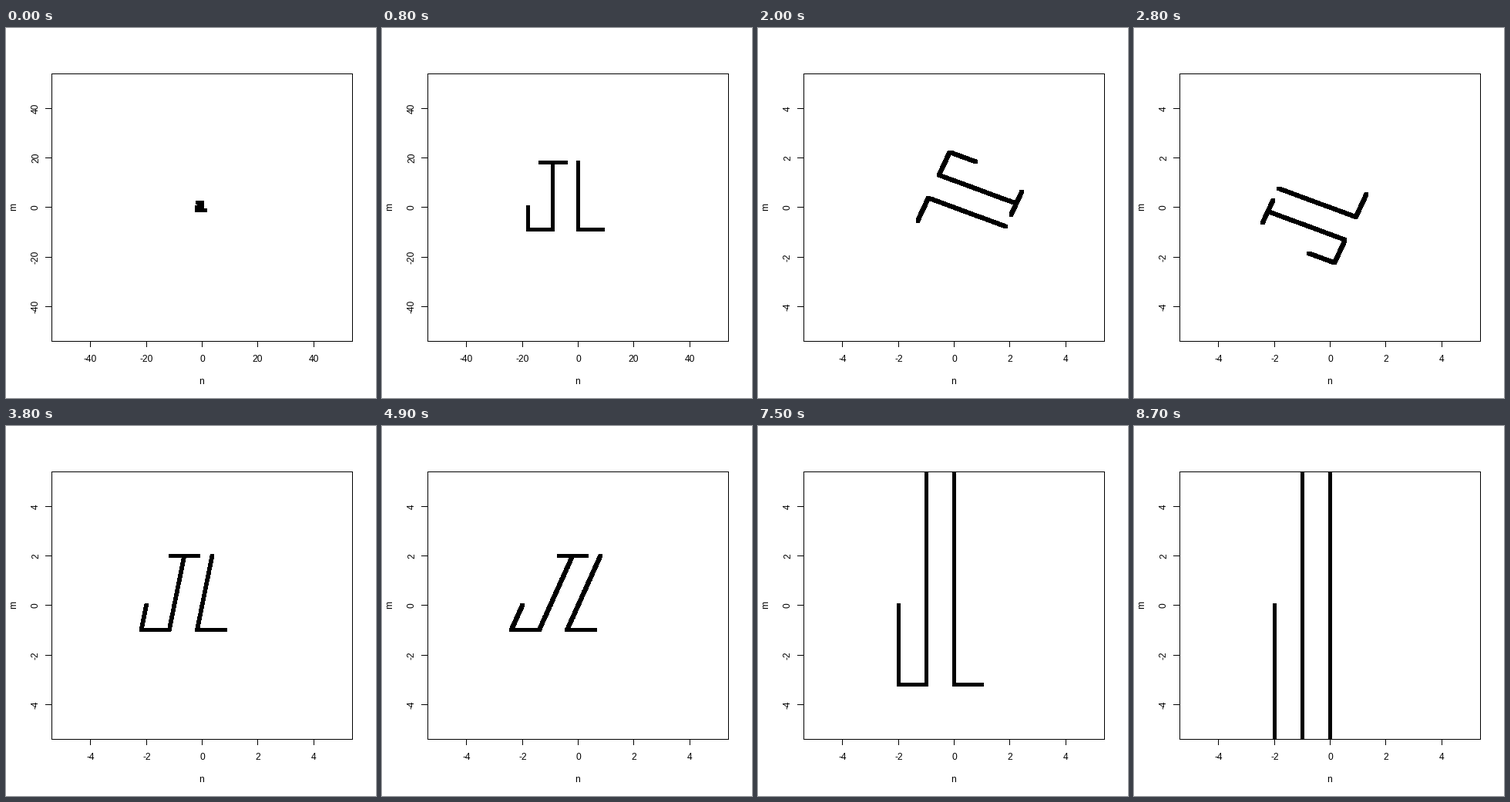
A matplotlib script that plays this animation: 480 px wide and 480 px high, repeating every 9 s.

```python
import numpy as np
import matplotlib.pyplot as plt
from matplotlib.animation import FuncAnimation
from matplotlib.patches import Rectangle

plt.rcParams["font.family"] = "Liberation Sans"
plt.rcParams["path.snap"] = False

SIZE, DPI = 480, 100
PX = 72 / DPI                               # points per pixel
LEFT, TOP, RIGHT, BOTTOM = 59.04, 59.04, 449.76, 406.56
CX, CY = (LEFT + RIGHT) / 2, (TOP + BOTTOM) / 2
TICKS = (-4, -2, 0, 2, 4)

# Strokes of the letters J and L
STROKES = [
    [(-1.5, 2), (-0.5, 2)],
    [(-1, 2), (-1, -1), (-2, -1), (-2, 0)],
    [(0, 2), (0, -1), (1, -1)],
]


def sample(stroke, n=200):
    """Dense points along a polyline, ended by a gap."""
    p = np.array(stroke, float)
    t = np.linspace(0, 1, n)[:, None]
    parts = [a + (b - a) * t for a, b in zip(p[:-1], p[1:])]
    return np.vstack(parts + [[[np.nan, np.nan]]])


POINTS = np.vstack([sample(s) for s in STROKES])


def to_pixels(x, y, limit):
    """Data coordinates to whole-pixel centres."""
    px = CX + x * (RIGHT - LEFT) / (2 * limit)
    py = CY - y * (BOTTOM - TOP) / (2 * limit)
    return np.floor(px) + 0.5, np.floor(py) + 0.5


def transform(frame):
    """Matrix of the current step: scale, rotate, shear, then stretch."""
    if frame < 10:
        return np.eye(2) * (frame + 1)
    if frame < 30:
        a = (frame - 9) * np.pi / 8
        return np.array([[np.cos(a), -np.sin(a)], [np.sin(a), np.cos(a)]])
    if frame < 60:
        return np.array([[1, 0.02 * (frame - 29)], [0, 1]])
    return np.diag([1, 0.2 * (frame - 59)])


fig = plt.figure(figsize=(SIZE / DPI, SIZE / DPI), dpi=DPI, facecolor="white")
ax = fig.add_axes([0, 0, 1, 1])
ax.set_xlim(0, SIZE)
ax.set_ylim(SIZE, 0)
ax.axis("off")


def line(xs, ys):
    ax.plot(xs, ys, color="black", lw=PX, antialiased=False,
            solid_capstyle="butt")


def label(x, y, text="", rotation=0):
    return ax.text(x, y, text, size=12 * PX, color="black", ha="center",
                   va="baseline", rotation=rotation, rotation_mode="anchor")


ax.add_patch(Rectangle((59.5, 59.5), 390, 347, fill=False, edgecolor="black",
                       lw=PX, antialiased=False, joinstyle="miter"))

x_labels, y_labels = [], []
for tick in TICKS:
    tx, ty = to_pixels(tick, tick, 5.4)
    line([tx, tx], [406, 414])
    line([51, 59], [ty, ty])
    x_labels.append(label(tx, 433))
    y_labels.append(label(42, ty, rotation=90))
label(CX - 0.5, 462, "n")
label(13, CY - 0.5, "m", rotation=90)

shape, = ax.plot([], [], color="black", lw=5 * PX, antialiased=False,
                 solid_capstyle="round", solid_joinstyle="round")
shape.set_clip_path(Rectangle((59, 59), 391, 348, transform=ax.transData))


def draw(frame):
    unit = 10 if frame < 10 else 1
    x, y = transform(frame) @ POINTS.T
    shape.set_data(*to_pixels(x, y, 5.4 * unit))
    for tick, xl, yl in zip(TICKS, x_labels, y_labels):
        xl.set_text(str(tick * unit))
        yl.set_text(str(tick * unit))
    return [shape, *x_labels, *y_labels]


anim = FuncAnimation(fig, draw, frames=90, interval=100, repeat=True)
plt.show()
```
